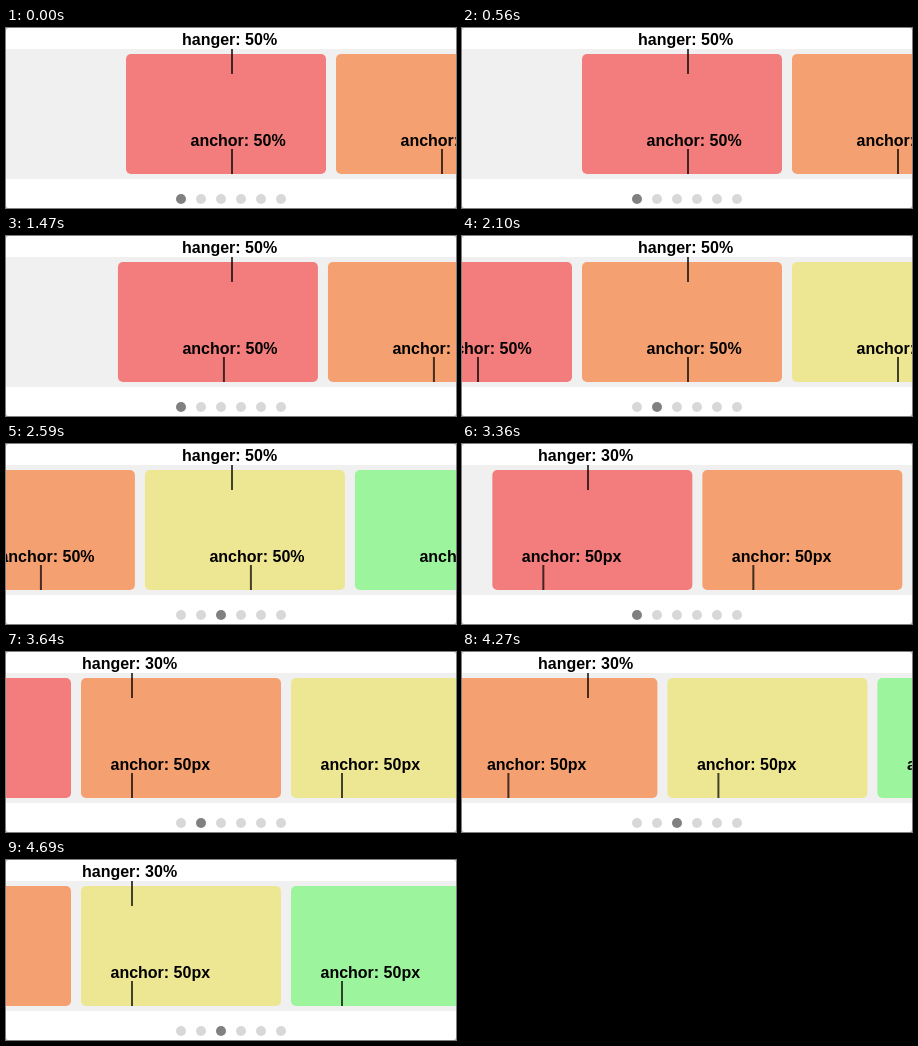
These frames come from a looping animation (450x180 px, 4.76 s). An HTML page:

```html
<!DOCTYPE html>
<html>
<head>
<meta charset="utf-8">
<style>
html, body { margin: 0; width: 100%; height: 100%; overflow: hidden; background: #c4c4c4; }
svg { display: block; width: 450px; height: 180px; background: #fff; border-radius: 3px; }
text { font: bold 16px "Liberation Sans", Arial, sans-serif; }
.line { fill: #000; fill-opacity: .72; }
</style>
</head>
<body>
<svg viewBox="0 0 450 180">
  <rect y="21" width="450" height="130" fill="#f0f0f0"/>
  <g id="cards"></g>
  <g id="hanger">
    <text x="-49" y="17"></text>
    <rect class="line" y="21" width="2" height="25"/>
  </g>
  <g id="dots"></g>
</svg>
<script>
const LOOP = 4760, STEP = 70, PITCH = 210, SWITCH = 3080;
const colors = ['#f37c7c', '#f5a071', '#ede692', '#9cf49c'];
const scenes = [
  { hanger: '50%', hangerX: 225, anchor: '50%', left: 120, labelX: 64.5, lineX: 105,
    moves: [[1421, 390], [2187, 500]] },
  { hanger: '30%', hangerX: 125, anchor: '50px', left: 75, labelX: 29.5, lineX: 50,
    moves: [[3241, 390], [4080, 450]] }
];

const cards = document.getElementById('cards');
const hanger = document.getElementById('hanger');
const dots = document.getElementById('dots');

cards.innerHTML = colors.map((color, i) => `<g transform="translate(${i * PITCH})">
  <rect y="26" width="200" height="120" rx="5" fill="${color}"/>
  <text y="118"></text>
  <rect class="line" y="121" width="2" height="25"/></g>`).join('');
dots.innerHTML = [0, 1, 2, 3, 4, 5].map(i =>
  `<circle cx="${175 + i * 20}" cy="171" r="5"/>`).join('');

const swing = p => (1 - Math.cos(Math.PI * Math.min(1, Math.max(0, p)))) / 2;
let current;

function setScene(scene) {
  current = scene;
  hanger.setAttribute('transform', `translate(${scene.hangerX})`);
  hanger.querySelector('text').textContent = 'hanger: ' + scene.hanger;
  for (const card of cards.children) {
    const label = card.querySelector('text');
    label.textContent = 'anchor: ' + scene.anchor;
    label.setAttribute('x', scene.labelX);
    card.querySelector('.line').setAttribute('x', scene.lineX);
  }
}

function draw(now) {
  const t = Math.floor(now % LOOP / STEP) * STEP;
  const scene = scenes[t < SWITCH ? 0 : 1];
  if (scene !== current) setScene(scene);
  const index = scene.moves.reduce((sum, [start, time]) => sum + swing((t - start) / time), 0);
  cards.setAttribute('transform', `translate(${scene.left - index * PITCH})`);
  const active = Math.floor(index + .7);
  [...dots.children].forEach((dot, i) => dot.setAttribute('fill', i === active ? '#808080' : '#d8d8d8'));
}

const begin = performance.now();
function tick() {
  draw(performance.now() - begin);
  requestAnimationFrame(tick);
}
tick();
</script>
</body>
</html>
```
